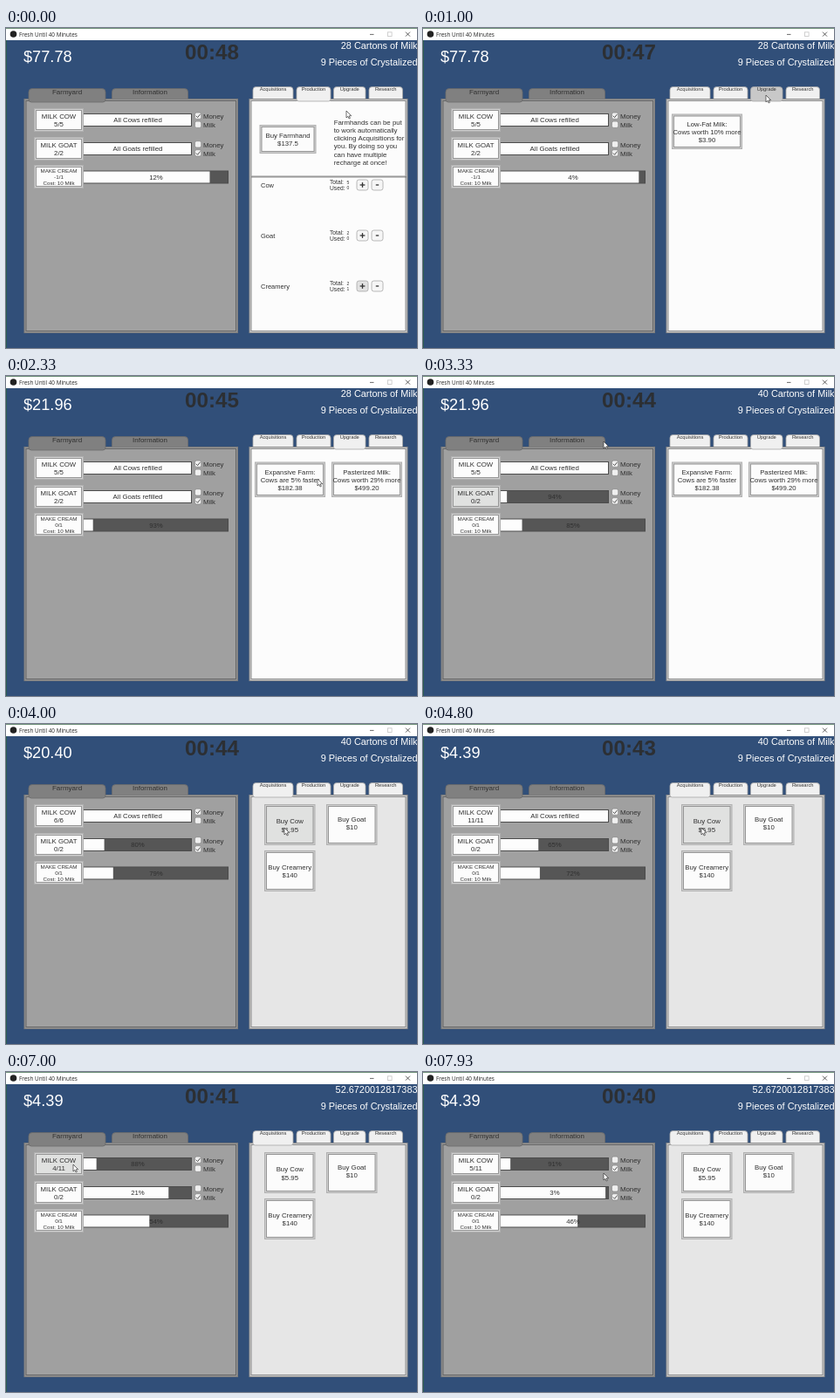
These frames come from a looping animation (471x367 px, 8000 ms). An HTML page with a canvas:

```html
<!DOCTYPE html>
<html lang="en">
<head>
<meta charset="utf-8">
<title>Farm clicker</title>
<style>
  html, body { margin: 0; width: 100%; height: 100%; overflow: hidden; background: #314f79; }
  canvas { display: block; width: 471px; height: 367px; }
</style>
</head>
<body>
<canvas id="stage"></canvas>
<script>
const W = 471, H = 367, LOOP = 8;
const canvas = document.getElementById('stage');
const ctx = canvas.getContext('2d');
const scale = window.devicePixelRatio || 1;
canvas.width = W * scale;
canvas.height = H * scale;

const SANS = '"Liberation Sans", Arial, sans-serif';
const INK = '#303030';

// Event times in seconds
const OPEN_UPGRADES = 0.85, BUY_LOW_FAT = 1.35, BUY_FARM = 1.95;
const MILK_GOATS = 3.04, OPEN_SHOP = 3.75;
const COW_BUYS = [4, 4.13, 4.26, 4.39, 4.52, 4.65];
const MILK_COWS = 5.931, MILK_GAP = 0.148, COW_REFILL = 0.957;
const SWITCH_TO_MILK = 7.4;

const COW_PRICE = 1.561, COW_PRICE_GROWTH = 1.25, MILK_PER_COW = 1.58400016021729;

// Pointer path: time, x, y
const PATH = [
  [0, 390, 95], [0.6, 394, 77], [1, 393, 77], [1.3, 330, 118], [2, 340, 120],
  [2.33, 357, 118], [2.85, 75, 138], [3.1, 75, 138], [3.33, 207, 75], [3.65, 306, 73],
  [3.8, 306, 73], [4, 319, 119], [5.1, 319, 119], [5.8, 77, 106], [7.03, 77, 106],
  [7.3, 220, 110], [7.5, 220, 110], [7.93, 207, 116], [8, 207, 116]
];

let pointer = { x: 0, y: 0 };

function pointerAt(t) {
  const i = Math.max(1, PATH.findIndex(p => p[0] >= t));
  const [t0, x0, y0] = PATH[i - 1], [t1, x1, y1] = PATH[i];
  const u = (t - t0) / (t1 - t0), e = u * u * (3 - 2 * u);
  return { x: x0 + (x1 - x0) * e, y: y0 + (y1 - y0) * e };
}

const cowsBought = t => COW_BUYS.filter(b => t >= b).length;
const cowsMilked = t =>
  t < MILK_COWS ? 0 : Math.min(8, 1 + Math.floor((t - MILK_COWS) / MILK_GAP));

function rect(x, y, w, h, color) {
  ctx.fillStyle = color;
  ctx.fillRect(x, y, w, h);
}

function rounded(x, y, w, h, radii, fill, stroke) {
  ctx.beginPath();
  ctx.roundRect(x, y, w, h, radii);
  ctx.fillStyle = fill;
  ctx.fill();
  ctx.strokeStyle = stroke;
  ctx.lineWidth = 0.8;
  ctx.stroke();
}

function line(color, width, ...points) {
  ctx.beginPath();
  points.forEach(([x, y]) => ctx.lineTo(x, y));
  ctx.strokeStyle = color;
  ctx.lineWidth = width;
  ctx.stroke();
}

function text(str, x, y, size, align = 'left', color = INK, font = SANS, weight = 'normal') {
  ctx.font = `${weight} ${size}px ${font}`;
  ctx.textAlign = align;
  ctx.fillStyle = color;
  ctx.fillText(str, x, y);
}

const hovered = (x, y, w, h) =>
  pointer.x >= x && pointer.x <= x + w && pointer.y >= y && pointer.y <= y + h;

// Nested frames, from the outer colour inwards
function frame(x, y, w, h, colors, fill) {
  colors.forEach((c, i) => rect(x + i, y + i, w - 2 * i, h - 2 * i, c));
  const n = colors.length;
  rect(x + n, y + n, w - 2 * n, h - 2 * n, fill);
}

function button(x, y, w, h, lines, baseline, { size = 7.8, pitch = 9.2, lit = hovered(x, y, w, h) } = {}) {
  frame(x, y, w, h, ['#b0b0b0', '#cfcfcf', '#969696'], lit ? '#e0e1e0' : '#fcfcfc');
  lines.forEach((s, i) => text(s, x + w / 2, baseline + i * pitch, size, 'center'));
}

function bar(x, y, w, left, idleLabel) {
  rect(x, y, w, 15, '#4c4c4c');
  const idle = left === null;
  const done = idle ? 1 : 1 - left / 100;
  rect(x + 1, y + 1, w - 2, 13, '#565656');
  rect(x, y + 1, (w - (idle ? 1 : 0)) * done, 13, '#fdfdfd');
  text(idle ? idleLabel : Math.floor(left) + '%', x + w / 2, y + 10.4, 7.8, 'center');
}

function toggle(label, y, on) {
  rounded(216.4, y, 7.4, 7.4, 2, '#efefef', '#8a8a8a');
  if (on) line('#555', 1, [217.8, y + 3.8], [219.6, y + 5.6], [222.6, y + 1.8]);
  text(label, 226, y + 6.8, 7.8);
}

function titleBar() {
  rect(0, 0, W, 14, '#fff');
  rect(0, 0, W, 0.8, '#4f7a5c');
  rect(0, 14, 1, H - 14, '#2a5c50');
  ctx.beginPath();
  ctx.arc(8.5, 7, 3.8, 0, 7);
  ctx.fillStyle = '#222';
  ctx.fill();
  text('Fresh Until 40 Minutes', 15, 9.5, 6.4, 'left', '#222', '"Open Sans", sans-serif');
  line('#444', 0.8, [417, 7.4], [421.5, 7.4]);
  ctx.strokeStyle = '#c4c4c4';
  ctx.strokeRect(437.5, 4.8, 4.6, 4.6);
  line('#333', 0.8, [458, 4.6], [463, 9.6]);
  line('#333', 0.8, [463, 4.6], [458, 9.6]);
}

function header(t) {
  const spent = COW_PRICE * (COW_PRICE_GROWTH ** cowsBought(t) - 1) / (COW_PRICE_GROWTH - 1);
  const money = t < BUY_LOW_FAT ? 77.78 : t < BUY_FARM ? 73.88 : 21.96 - spent;
  text('$' + money.toFixed(2), 20, 38.8, 18.2, 'left', '#fff');
  text('00:' + Math.floor(48.07 - t), 236, 36, 24.2, 'center', '#2c2f33', SANS, 'bold');

  const milked = cowsMilked(t);
  const milk = milked ? (40 + milked * MILK_PER_COW).toPrecision(15)
                      : (t < MILK_GOATS ? 28 : 40) + ' Cartons of Milk';
  text(milk, 471.5, 24, 10.9, 'right', '#fff');
  text('9 Pieces of Crystalized', 471.5, 43, 10.9, 'right', '#fff');
}

function farmyard(t) {
  rounded(121.5, 69.5, 87, 14, [4, 4, 0, 0], '#808080', '#6c6c6c');
  frame(20.5, 81, 245.5, 269, ['#7c7c7c', '#949494', '#666'], '#a0a0a0');
  rounded(26, 69.5, 88, 15.5, [4, 4, 3, 3], '#808080', '#6a6a6a');
  text('Farmyard', 70, 76, 8, 'center');
  text('Information', 165, 76, 8, 'center');

  const milking = t >= MILK_COWS;
  const refills = milking ? (t - MILK_COWS) / COW_REFILL : 0;
  const owned = 5 + cowsBought(t);
  const ready = owned - cowsMilked(t) + Math.floor(refills);
  bar(89, 98, 124, milking ? 100 * (1 - refills % 1) : null, 'All Cows refilled');
  button(32, 92, 57, 27, ['MILK COW', ready + '/' + owned], 103.8);

  const goats = t < MILK_GOATS ? null : 100 - 19.8 * (t - MILK_GOATS);
  bar(89, 131, 124, goats, 'All Goats refilled');
  button(32, 125, 57, 27, ['MILK GOAT', (goats === null ? 2 : 0) + '/2'], 136.8,
    { lit: t > 2.8 && t < OPEN_SHOP });

  const cream = 12.98 - 100 / 12 * t;
  bar(89, 163.5, 166, cream > 0 ? cream : cream + 100);
  button(32, 157, 57, 27, ['MAKE CREAM', cream > 0 ? '-1/1' : '0/1', 'Cost: 10 Milk'], 165.6,
    { size: 6.25, pitch: 7.4 });

  const toMilk = t >= SWITCH_TO_MILK;
  toggle('Money', 97, !toMilk);
  toggle('Milk', 107, toMilk);
  toggle('Money', 129.7, false);
  toggle('Milk', 139.7, true);
}

function stepper(x, y, sign, selected) {
  const plus = sign === '+';
  rounded(x, y, 13, 12, 2.5, selected ? '#e2e2e2' : '#f6f6f6', '#a6a6a6');
  line('#333', 1.3, [x + (plus ? 3.6 : 4.8), y + 6], [x + (plus ? 9.4 : 8.2), y + 6]);
  if (plus) line('#333', 1.3, [x + 6.5, y + 3.1], [x + 6.5, y + 8.9]);
}

function production() {
  rect(281, 169.4, 178, 1, '#aaa');
  rect(281, 170.4, 178, 1, '#707070');
  button(290.5, 111, 65, 33, ['Buy Farmhand', '$137.5'], 126, { pitch: 8.8 });
  ['Farmhands can be put', 'to work automatically', 'clicking Acquisitions for',
   'you. By doing so you', 'can have multiple', 'recharge at once!']
    .forEach((s, i) => text(s, 375.7, 111 + i * 9.15, 7.8));
  [['Cow', 5, 0], ['Goat', 2, 0], ['Creamery', 2, 1]].forEach(([name, total, used], i) => {
    const y = i * 58;
    text(name, 292, 182.8 + y, 7.5);
    text('Total:', 371, 178.7 + y, 6.7);
    text('Used:', 371, 185.6 + y, 6.7);
    text(total, 392, 178.7 + y, 5, 'center');
    text(used, 392, 185.3 + y, 5, 'center');
    stepper(402, 174 + y, '+', name === 'Creamery');
    stepper(419, 174 + y, '-');
  });
}

function upgrades(t) {
  const card = (x, ...lines) => button(x, 98.5, 81, 40.5, lines, 112.8, { size: 7.75, lit: false });
  if (t < BUY_LOW_FAT) {
    card(285, 'Low-Fat Milk:', 'Cows worth 10% more', '$3.90');
    return;
  }
  card(285, 'Expansive Farm:', 'Cows are 5% faster', t < BUY_FARM ? '$51.92' : '$182.38');
  card(373, 'Pasterized Milk:', 'Cows worth 29% more', '$499.20');
}

function shop(t) {
  const price = (COW_PRICE * COW_PRICE_GROWTH ** cowsBought(t)).toFixed(2);
  button(296, 92, 58.5, 47, ['Buy Cow', '$' + price], 114.4);
  button(367, 92, 58.5, 47, ['Buy Goat', '$10'], 112);
  button(296, 145, 58.5, 47, ['Buy Creamery', '$140'], 167);
}

function sidePanel(t) {
  const active = t < OPEN_UPGRADES ? 1 : t < OPEN_SHOP ? 2 : 0;
  const tabs = [['Acquisitions', 283, 46], ['Production', 333, 39], ['Upgrade', 375.5, 36.5], ['Research', 416, 38.5]];
  const tab = ([name, x, w], isActive) => {
    const h = isActive ? 16.5 : 15;
    const fill = hovered(x, 67, w, h) ? '#c8c8c8' : '#f0f0f0';
    rounded(x, 67.5, w, h, isActive ? [3.5, 3.5, 2.5, 2.5] : [3.5, 3.5, 0, 0], fill, '#a8a8a8');
  };
  tabs.forEach((s, i) => i !== active && tab(s, false));
  frame(278.5, 81, 182, 269, ['#8c8c8c', '#cfcfcf', '#8c8c8c'], active === 0 ? '#e6e6e6' : '#fcfcfc');
  tab(tabs[active], true);
  tabs.forEach(([name, x, w]) => text(name, x + w / 2, 72.3, 5.75, 'center'));
  [shop, production, upgrades][active](t);
}

function drawPointer() {
  const { x, y } = pointer;
  ctx.beginPath();
  [[0, 0], [0, 8], [1.9, 6.3], [3.1, 9], [4.4, 8.4], [3.2, 5.8], [5.7, 5.7]]
    .forEach(([dx, dy]) => ctx.lineTo(x + dx, y + dy));
  ctx.closePath();
  ctx.fillStyle = '#fff';
  ctx.fill();
  ctx.strokeStyle = '#333';
  ctx.lineWidth = 0.7;
  ctx.stroke();
}

function draw(now) {
  const t = (now / 1000) % LOOP;
  pointer = pointerAt(t);
  ctx.setTransform(scale, 0, 0, scale, 0, 0);
  rect(0, 0, W, H, '#314f79');
  titleBar();
  header(t);
  farmyard(t);
  sidePanel(t);
  drawPointer();
}

const start = performance.now();
function tick() {
  draw(performance.now() - start);
  requestAnimationFrame(tick);
}
tick();
</script>
</body>
</html>
```
